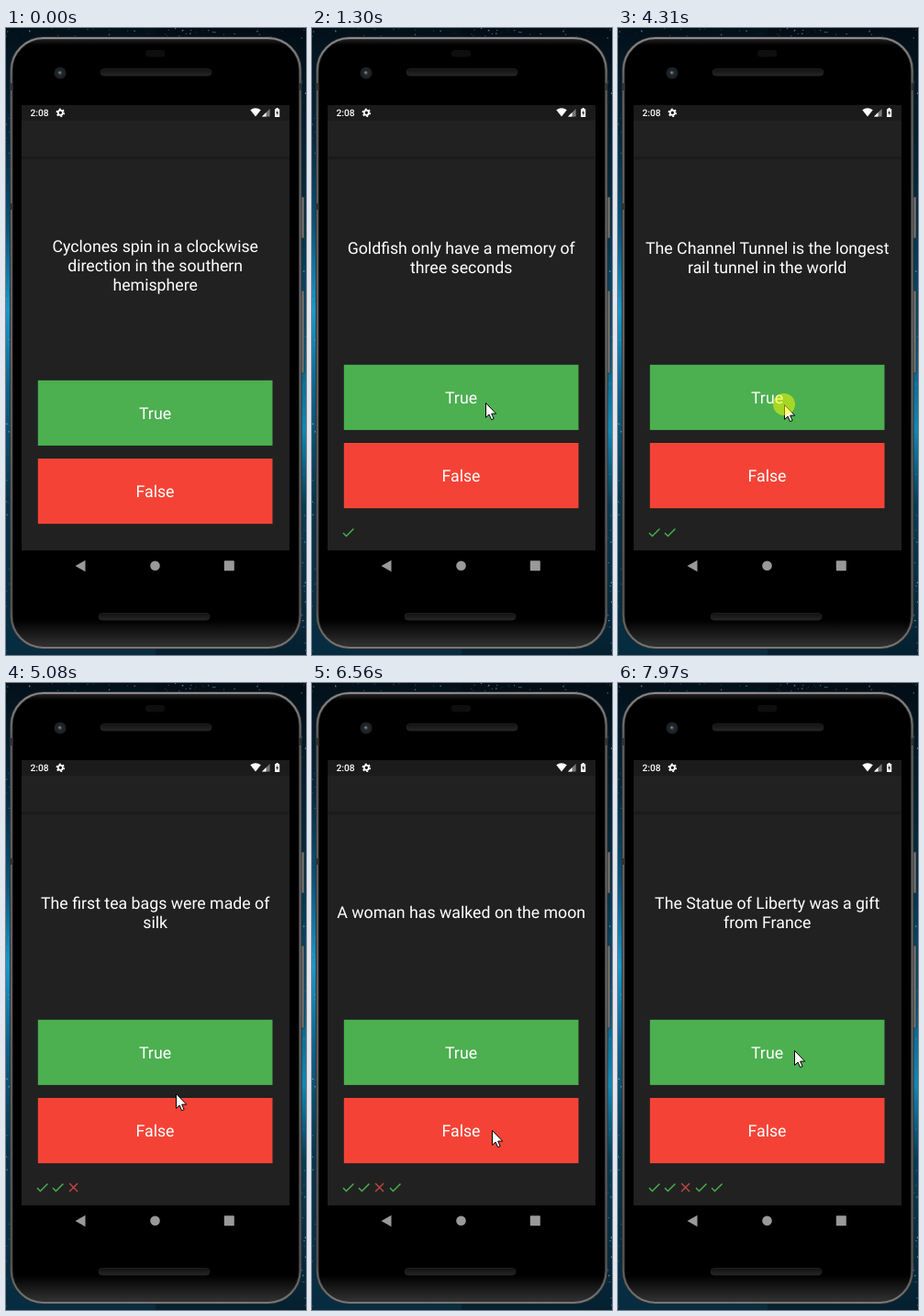
Write an HTML page that moves like this. It is 327 by 683 pixels and loops after 8000 ms.

```html
<!DOCTYPE html>
<html lang="en">
<head>
<meta charset="utf-8">
<title>True or false quiz</title>
<style>
  html, body { margin: 0; height: 100%; overflow: hidden; background: #03141f; }
  svg { display: block; width: 100vw; height: 100vh; }
  text { font-family: Roboto, sans-serif; fill: #fff; text-rendering: geometricPrecision; }
  .big { font-size: 17.74px; text-anchor: middle; }
</style>
</head>
<body>
<svg viewBox="0 0 327 683" preserveAspectRatio="none">
  <defs>
    <linearGradient id="skyLeft" x2="0" y2="1">
      <stop offset="0" stop-color="#031019"/><stop offset=".16" stop-color="#04263a"/>
      <stop offset=".32" stop-color="#0a557c"/><stop offset=".45" stop-color="#1a98cc"/>
      <stop offset=".58" stop-color="#0c638c"/><stop offset=".75" stop-color="#07344c"/>
      <stop offset="1" stop-color="#072c40"/>
    </linearGradient>
    <linearGradient id="skyRight" x2="0" y2="1">
      <stop offset="0" stop-color="#020d16"/><stop offset=".28" stop-color="#052b40"/>
      <stop offset=".48" stop-color="#0c4f6e"/><stop offset=".64" stop-color="#1287b4"/>
      <stop offset=".76" stop-color="#083c55"/><stop offset="1" stop-color="#05202f"/>
    </linearGradient>
    <linearGradient id="rim" x2="0" y2="1">
      <stop offset="0" stop-color="#8a8a8a"/><stop offset=".08" stop-color="#606060"/>
      <stop offset=".5" stop-color="#6a6a6a"/><stop offset=".93" stop-color="#555"/>
      <stop offset="1" stop-color="#777"/>
    </linearGradient>
    <linearGradient id="body" x2="0" y2="1">
      <stop offset="0" stop-color="#262626"/><stop offset=".012" stop-color="#000"/>
      <stop offset=".955" stop-color="#000"/><stop offset="1" stop-color="#343434"/>
    </linearGradient>
    <linearGradient id="barShadow" x2="0" y2="1">
      <stop offset="0" stop-color="#171717"/><stop offset="1" stop-color="#212121"/>
    </linearGradient>
    <linearGradient id="grille" x2="0" y2="1">
      <stop offset="0" stop-color="#111"/><stop offset="1" stop-color="#262626"/>
    </linearGradient>
    <radialGradient id="lens">
      <stop offset="0" stop-color="#4b565e"/><stop offset=".4" stop-color="#22282c"/>
      <stop offset="1" stop-color="#1b1b1b"/>
    </radialGradient>
    <path id="check" d="M9 16.17 4.83 12 3.41 13.41 9 19 21 7 19.59 5.59z" fill="#4caf50"/>
    <path id="cross" d="M5.7 5.7 18.3 18.3M18.3 5.7 5.7 18.3" stroke="#b84544" stroke-width="2.2"/>
  </defs>

  <rect width="164" height="683" fill="url(#skyLeft)"/>
  <rect x="163" width="164" height="683" fill="url(#skyRight)"/>
  <g id="stars"></g>

  <!-- phone body -->
  <g fill="#777" stroke="#2a2a2a" stroke-width=".7">
    <rect x="319" y="184" width="6" height="45" rx="1"/>
    <rect x="319" y="286" width="6" height="90" rx="1"/>
  </g>
  <rect x="5.8" y="11" width="314.9" height="664" rx="35" fill="url(#body)" stroke="#2c2c2c" stroke-width="3.6"/>
  <rect x="5.8" y="11" width="314.9" height="664" rx="35" fill="none" stroke="url(#rim)" stroke-width="1.8"/>
  <path d="M4.5 60h3v8h-3zM4.5 191h3v7h-3zM319 60h3v8h-3z" fill="#333"/>
  <rect x="152" y="24" width="21" height="7.5" rx="3" fill="#0e0e0e"/>
  <circle cx="59" cy="49" r="6.6" fill="url(#lens)"/>
  <circle cx="58.500" cy="48.500" r="1.200" fill="#77838b"/>
  <g fill="url(#grille)" stroke="#242424" stroke-width=".8">
    <rect x="103" y="44.5" width="121" height="7.5" rx="3.7"/>
    <rect x="101" y="637.5" width="121" height="7.5" rx="3.7"/>
  </g>

  <!-- screen -->
  <rect x="17" y="84" width="292" height="485" fill="#212121"/>
  <rect x="17" y="84" width="292" height="17" fill="#1b1b1b"/>
  <rect x="17" y="140.5" width="292" height="4" fill="url(#barShadow)"/>
  <text x="26.5" y="96" font-size="10.2" font-weight="500">2:08</text>
  <g fill="none" stroke="#fff">
    <circle cx="59.3" cy="92.3" r="2.6" stroke-width="1.8"/>
    <circle cx="59.3" cy="92.3" r="4" stroke-width="1.5" stroke-dasharray="2 2.19"/>
  </g>
  <path d="M266.3 89.2Q272 85.2 277.8 89.2L272 96.6z" fill="#fff"/>
  <path d="M279 96.5 287.6 88v8.5z" fill="#777"/>
  <path d="M279 96.5 283.5 92v4.5z" fill="#fff"/>
  <path d="M293 88.3h1.6V87h2v1.3h1.6v8.7H293z" fill="#fff"/>
  <path d="M296 89.5l-1.8 3.4h1.2v2.6l1.7-3.5h-1.1z" fill="#222"/>

  <g fill="#999">
    <path d="M75.5 586 86.5 579.7v12.6z"/>
    <circle cx="162.5" cy="585.7" r="5.3"/>
    <rect x="237.8" y="580.2" width="11" height="11" rx=".8"/>
  </g>

  <g id="question"></g>
  <g id="buttons">
    <rect id="press" x="23.6" width="278" height="71.2" fill="#1c1c1c"/>
    <rect x="34.8" y="366.8" width="255.7" height="71.1" fill="#4caf50"/>
    <rect x="34.8" y="452" width="255.7" height="71.1" fill="#f44336"/>
    <text class="big" x="162.5" y="408.9">True</text>
    <text class="big" x="162.5" y="494.1">False</text>
  </g>
  <g id="marks"></g>

  <g id="pointer">
    <path d="M.5.5V16.4L4.1 13 6.6 18.7 9.1 17.6 6.7 12.1H11.7z" fill="#fff" stroke="#000"/>
    <circle id="click" r="12" fill="#ff0" opacity=".5"/>
  </g>
</svg>
<script>
const LOOP = 8000;
const $ = id => document.getElementById(id);

const questions = [
  [0, 'Cyclones spin in a clockwise', 'direction in the southern', 'hemisphere'],
  [1300, 'Goldfish only have a memory of', 'three seconds'],
  [2930, 'The Channel Tunnel is the longest', 'rail tunnel in the world'],
  [4540, 'The first tea bags were made of', 'silk'],
  [5950, 'A woman has walked on the moon'],
  [7030, 'The Statue of Liberty was a gift', 'from France'],
];
const results = ['check', 'check', 'cross', 'check', 'check'];

// first step, last step, number of steps, end x, end y
const moves = [
  [230, 230, 1, 217, 541],
  [305, 530, 4, 189, 408],
  [2080, 2390, 5, 184, 469],
  [4000, 4080, 2, 181, 410],
  [5000, 5160, 3, 187, 460],
  [5390, 5460, 2, 181, 419],
  [6330, 6560, 4, 196, 487],
  [7350, 7500, 3, 192, 400],
];
const TRUE_TOP = 366.8, FALSE_TOP = 452;
// down, up, top of the pressed button
const clicks = [
  [840, 920, TRUE_TOP], [2620, 2770, FALSE_TOP], [4310, 4460, TRUE_TOP],
  [5710, 5870, TRUE_TOP], [6790, 6880, FALSE_TOP], [7900, 7970, TRUE_TOP],
];

const show = (el, on) => el.setAttribute('visibility', on ? 'visible' : 'hidden');
const smooth = p => p * p * (3 - 2 * p);

function pointerAt(t) {
  let x = 217, y = 541;
  for (const [start, end, steps, toX, toY] of moves) {
    if (t < start) break;
    const step = t >= end ? steps : 1 + Math.floor((t - start) * (steps - 1) / (end - start) + 1e-6);
    const p = smooth(step / steps);
    x += (toX - x) * p;
    y += (toY - y) * p;
  }
  return [Math.round(x), Math.round(y)];
}

function drawQuestion(index) {
  const lines = questions[index].slice(1);
  const middle = index ? 256.2 : 264.7;
  $('question').innerHTML = lines.map((line, i) =>
    `<text class="big" x="162.7" y="${middle + (i - (lines.length - 1) / 2) * 21.2}">${line}</text>`).join('');
  $('marks').innerHTML = results.slice(0, index).map((name, i) =>
    `<use href="#${name}" transform="translate(${31 + i * 17.03} 541) scale(.71)"/>`).join('');
  $('buttons').setAttribute('transform', `translate(0 ${index ? 0 : 17})`);
}

function drawStars() {
  let seed = 7;
  const random = () => (seed = seed * 16807 % 2147483647) / 2147483647;
  let stars = '';
  for (let i = 0; i < 150; i++) {
    const side = random(), along = random(), depth = random();
    const [x, y] = side < .4 ? [along * 327, depth * 11]
      : [side < .7 ? depth * 6 : 321 + depth * 6, along * 683];
    stars += `<circle cx="${x}" cy="${y}" r="${.3 + random() * .6}" fill="#5fb4d6" opacity="${.2 + random() * .6}"/>`;
  }
  $('stars').innerHTML = stars;
}

let shown = -1;
function frame() {
  const t = performance.now() % LOOP;
  const index = questions.filter(q => t >= q[0]).length - 1;
  if (index !== shown) drawQuestion(shown = index);

  show($('pointer'), t >= 230);
  $('pointer').setAttribute('transform', `translate(${pointerAt(t)})`);
  $('click').setAttribute('display', clicks.some(([down, up]) => t >= down && t < up) ? 'inline' : 'none');

  // the press highlight lags the click and lasts until the next question
  const pressed = clicks.find(([down], i) => t >= down + 150 && t < (questions[i + 1] || [LOOP])[0]);
  show($('press'), pressed);
  if (pressed) $('press').setAttribute('y', pressed[2]);

  requestAnimationFrame(frame);
}

drawStars();
frame();
</script>
</body>
</html>
```
